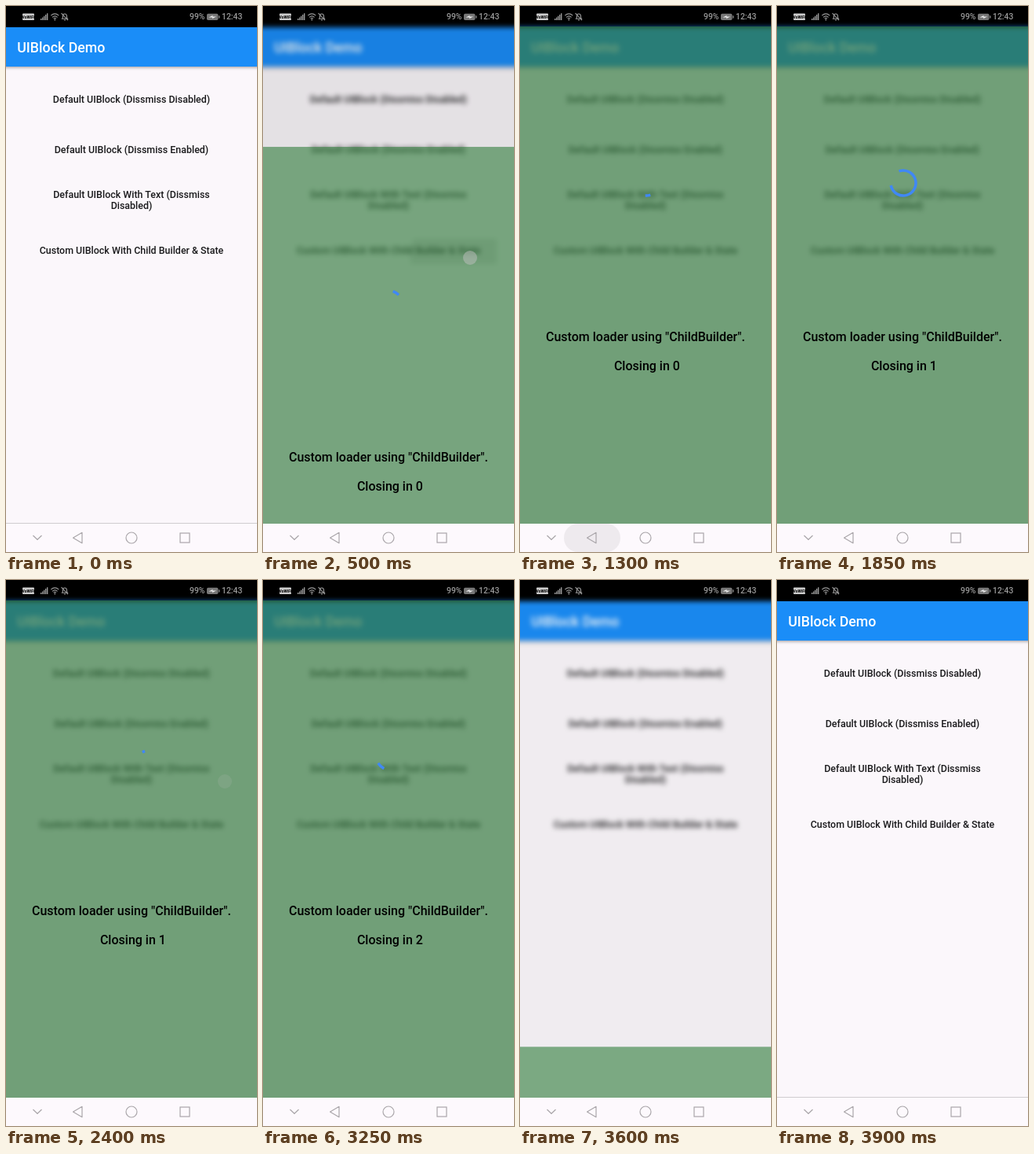
Animation of 320x694 px, one loop 4.2 s. Source, as an HTML page:

```html
<!DOCTYPE html>
<html lang="en">
<head>
<meta charset="utf-8">
<title>UIBlock Demo</title>
<style>
html, body { margin: 0; width: 100%; height: 100%; overflow: hidden; background: #000; }
#stage { position: relative; width: 320px; height: 694px; overflow: hidden; font: 500 12.44px/14.4px Roboto, sans-serif; color: #1a1a1c; }
#stage div, #stage svg { position: absolute; }
#view { left: 0; top: 0; width: 320px; height: 658px; overflow: hidden; }
#app { left: -20px; top: -20px; width: 360px; height: 714px; background: #fbf7fb; }
#app .status { left: 0; top: 0; width: 100%; height: 47px; background: #000; }
#app .bar { left: 0; top: 46.5px; width: 100%; height: 50px; background: #1a8df8; box-shadow: 0 1px 4px rgba(0, 0, 0, .4); }
#app .title { left: 34.2px; top: 14px; font-size: 17.78px; line-height: 24px; color: #fff; white-space: nowrap; }
#app .button { left: 42px; width: 276px; height: 32px; display: flex; align-items: center; justify-content: center; text-align: center; overflow: hidden; border-radius: 2px; }
#ripple { left: 166px; top: -51px; width: 150px; height: 150px; border-radius: 50%; background: rgba(0, 0, 0, .1); }
#dim { inset: 0; background: #000; }
#sheet { left: 0; top: 26px; width: 320px; height: 632px; background: rgba(53, 128, 64, .625); color: #000; }
#sheet .line { width: 100%; text-align: center; font-size: 16px; line-height: 20px; }
#spinner { left: 141px; top: 179px; }
.touch { width: 18px; height: 18px; border-radius: 50%; background: rgba(192, 192, 192, .5); }
#nav { left: 0; top: 658px; width: 320px; height: 36px; background: #fdf9fd; }
#navLine { left: 0; top: -1px; width: 100%; height: 1px; background: #d0cdd0; }
#press { left: 56px; top: 0; width: 72px; height: 36px; border-radius: 18px; background: #eeeaee; }
#icons, #nav svg { left: 0; top: 0; }
</style>
</head>
<body>
<div id="stage">
  <div id="view">
    <div id="app">
      <div class="status"></div>
      <div class="bar"><div class="title">UIBlock Demo</div></div>
      <div class="button" style="top:123px">Default UIBlock (Dissmiss Disabled)</div>
      <div class="button" style="top:187px">Default UIBlock (Dissmiss Enabled)</div>
      <div class="button" style="top:251.3px">Default UIBlock With Text (Dissmiss<br>Disabled)</div>
      <div class="button" style="top:315.5px"><div id="ripple"></div>Custom UIBlock With Child Builder &amp; State</div>
    </div>
    <div id="dim"></div>
    <div id="sheet">
      <svg id="spinner" width="40" height="40" viewBox="-20 -20 40 40">
        <path id="arc" fill="none" stroke="#4088f5" stroke-width="3.55" stroke-linecap="square"/>
      </svg>
      <div class="line" style="top:384.6px">Custom loader using "ChildBuilder".</div>
      <div class="line" style="top:421.5px;left:1.9px">Closing in <span id="count">0</span></div>
    </div>
  </div>

  <svg id="icons" width="320" height="27" fill="#999" font-family="Roboto, sans-serif">
    <rect x="21" y="9.5" width="15" height="8.5" rx="1" fill="#ccc"/>
    <text x="28.5" y="16" font-size="5" font-weight="800" text-anchor="middle" fill="#111">VoWiFi</text>
    <path d="M44 16h1.4v2H44zM46 14.5h1.4V18H46zM48 12.8h1.4V18H48zM50 11h1.4v7H50zM52 9.2h1.4V18H52z"/>
    <g fill="none" stroke="#999" stroke-width="1.1">
      <path d="M57.3 12.2q5-4.6 10 0M59 14.3q3.3-3 6.6 0M60.7 16.2q1.6-1.5 3.2 0"/>
      <path d="M71.5 16.2h7l-1-1.5v-2.2q-.3-2.5-2.6-2.5t-2.5 2.5v2.2zM74 18h2M70.5 9.2l8.5 9"/>
    </g>
    <circle cx="62.3" cy="17.6" r=".9"/>
    <text x="234" y="17.2" font-size="10.4">99%</text>
    <rect x="256" y="9.8" width="14.5" height="8.2" rx="1.8" fill="#777"/>
    <rect x="271" y="12.2" width="1.6" height="3.4" rx=".6" fill="#777"/>
    <path d="M258.5 14.4l5-2.4v1.4h4.6l-5 2.5v-1.5z" fill="#eee"/>
    <text x="275" y="17.2" font-size="10.4">12:43</text>
  </svg>

  <div id="nav">
    <div id="navLine"></div>
    <div id="press"></div>
    <svg width="320" height="36" fill="none" stroke="#aaa6aa" stroke-width="1.2">
      <path d="M34.5 15l5.5 5.3 5.5-5.3M97 11.3v13.4L85.5 18z" stroke-linejoin="round"/>
      <circle cx="160" cy="18" r="7"/>
      <rect x="222" y="12" width="12" height="12"/>
    </svg>
  </div>
  <div id="touchA" class="touch" style="left:254.5px;top:311px"></div>
  <div id="touchB" class="touch" style="left:270px;top:247px"></div>
</div>

<script>
const LOOP = 4200, OPEN = 409.9, CLOSE = 3495.2, SLIDE = 150, SPIN = 425;
const TRAVEL = 632, RADIUS = 16;
const el = Object.fromEntries([...document.querySelectorAll('[id]')].map(e => [e.id, e]));

const clamp = x => Math.min(1, Math.max(0, x));
const ramp = (t, from, to) => clamp((t - from) / (to - from));
const pulse = (t, a, b, c, d) => ramp(t, a, b) * (1 - ramp(t, c, d));
const easeInOut = x => x < .5 ? 4 * x ** 3 : 1 - 4 * (1 - x) ** 3;

// cubic-bezier(.4, 0, .2, 1), solved by bisection
function fastOutSlowIn(x) {
  if (x <= 0 || x >= 1) return clamp(x);
  let lo = 0, hi = 1, s = .5;
  for (let i = 0; i < 20; i++) {
    s = (lo + hi) / 2;
    const bx = 1.2 * s * (1 - s) ** 2 + .6 * s * s * (1 - s) + s ** 3;
    if (bx < x) lo = s; else hi = s;
  }
  return 3 * s * s * (1 - s) + s ** 3;
}

// Indeterminate ring: the head runs ahead, then the tail catches up
function arcPath(ms) {
  const turns = Math.max(0, ms) / 1000, step = Math.floor(turns), phase = turns - step;
  const head = fastOutSlowIn(phase * 2), tail = fastOutSlowIn(phase * 2 - 1);
  const sweep = Math.max(1.5 * Math.PI * (head - tail), .001);
  const start = Math.PI * (-.5 + 1.5 * tail + 1.7 * phase - .8 * step);
  const point = a => `${(RADIUS * Math.cos(a)).toFixed(3)} ${(RADIUS * Math.sin(a)).toFixed(3)}`;
  return `M${point(start)}A${RADIUS} ${RADIUS} 0 ${+(sweep > Math.PI)} 1 ${point(start + sweep)}`;
}

function draw(t) {
  const shown = pulse(t, OPEN, OPEN + SLIDE, CLOSE, CLOSE + SLIDE);
  const active = shown > 0;
  el.app.style.filter = active ? 'blur(3.2px)' : 'none';
  el.dim.style.opacity = .15 * shown;
  el.sheet.style.visibility = active ? 'visible' : 'hidden';
  el.sheet.style.transform = `translateY(${TRAVEL * (1 - easeInOut(shown))}px)`;
  el.navLine.style.visibility = active ? 'hidden' : 'visible';
  el.arc.setAttribute('d', arcPath(t - SPIN));
  el.count.textContent = t < 1500 ? 0 : t < 2525 ? 1 : 2;

  el.ripple.style.transform = `scale(${.15 + .85 * ramp(t, 350, 500)})`;
  el.ripple.style.opacity = pulse(t, 349, 350, 500, 750);
  el.touchA.style.opacity = pulse(t, 349, 350, 500, 900);
  el.touchB.style.opacity = .8 * pulse(t, 1950, 2050, 2250, 2500);
  el.press.style.opacity = pulse(t, 1180, 1270, 1350, 1550);
}

function tick() {
  draw(performance.now() % LOOP);
  requestAnimationFrame(tick);
}
tick();
</script>
</body>
</html>
```
